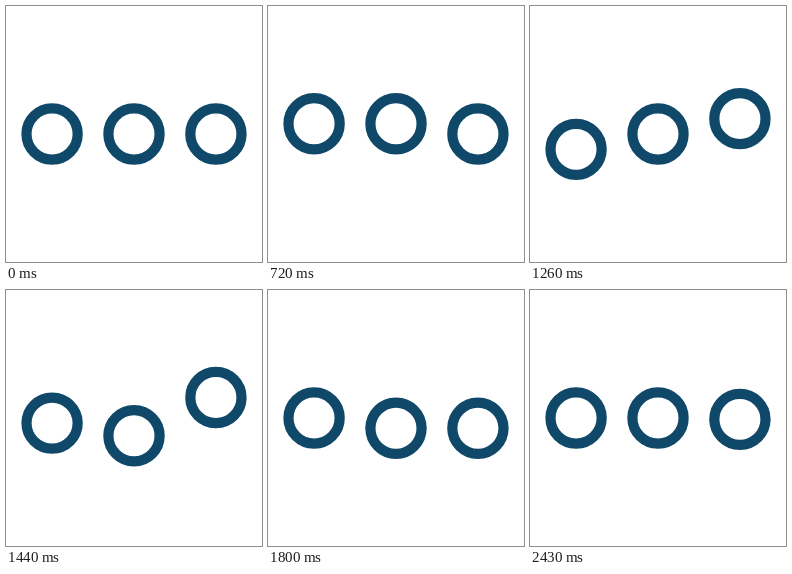
An HTML page with a canvas that plays this animation: 256x256 px, repeating every 2520 ms.

```html
<!DOCTYPE html>
<html lang="en">
<head>
<meta charset="utf-8">
<title>Loading rings</title>
<style>
  html, body { margin: 0; width: 100%; height: 100%; overflow: hidden; background: #fff; }
  canvas { display: block; width: 256px; height: 256px; }
</style>
</head>
<body>
<canvas id="stage" width="256" height="256"></canvas>
<script>
  const ctx = document.getElementById('stage').getContext('2d');
  const LOOP = 2520, STEP = 90;
  const PHASE = 540, DELAY = 450;
  const SPACING = 81.92, RADIUS = 25.6, STROKE = 10.24;
  const STOPS = [0, -20.48, 20.48, 0];

  const ease = p => (1 - Math.cos(Math.PI * p)) / 2;

  // Vertical offset of a ring: rest, up, down, rest.
  function bounce(time) {
    const phase = time / PHASE;
    if (phase <= 0 || phase >= STOPS.length - 1) return 0;
    const i = Math.floor(phase);
    return STOPS[i] + (STOPS[i + 1] - STOPS[i]) * ease(phase - i);
  }

  function draw(time) {
    ctx.fillStyle = '#fff';
    ctx.fillRect(0, 0, 256, 256);
    ctx.strokeStyle = '#0f4869';
    ctx.lineWidth = STROKE;
    for (let i = 0; i < 3; i++) {
      ctx.beginPath();
      ctx.arc(128 + (i - 1) * SPACING, 128 + bounce(time - i * DELAY), RADIUS, 0, Math.PI * 2);
      ctx.stroke();
    }
  }

  const start = performance.now();
  function tick() {
    const elapsed = (performance.now() - start) % LOOP;
    draw(Math.floor(elapsed / STEP) * STEP);
    requestAnimationFrame(tick);
  }
  tick();
</script>
</body>
</html>
```
